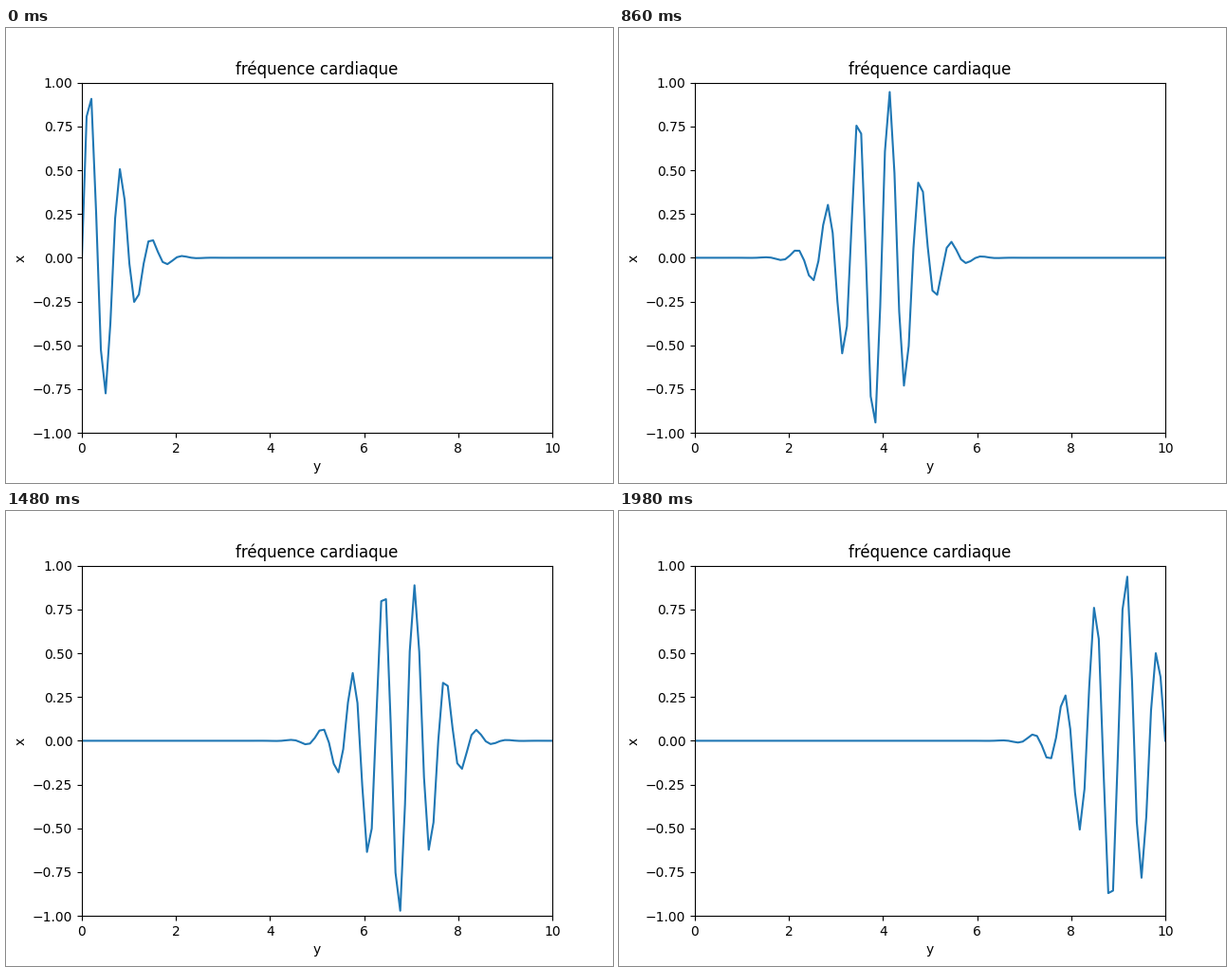
A matplotlib script for the animation above (2000 ms loop, 640 by 480 pixels).

```python
import numpy as np
import matplotlib.pyplot as plt
from matplotlib.animation import FuncAnimation

FRAMES = 100
INTERVAL = 20  # ms

x = np.linspace(0, 10, 100)
times = np.linspace(0, 3, FRAMES)

fig, ax = plt.subplots(figsize=(6.4, 4.8), dpi=100)
ax.set(xlim=(0, 10), ylim=(-1, 1), xlabel="y", ylabel="x",
       title="fréquence cardiaque")
line, = ax.plot([], [])


def packet(t):
    """Gaussian envelope at speed 3 over a carrier wave at speed 1."""
    return np.exp(-(x - 3 * t) ** 2) * np.sin(3 * np.pi * (x - t))


def update(i):
    line.set_data(x, packet(times[i]))
    return line,


anim = FuncAnimation(fig, update, frames=FRAMES, interval=INTERVAL,
                     repeat=True, repeat_delay=0)
plt.show()
```
